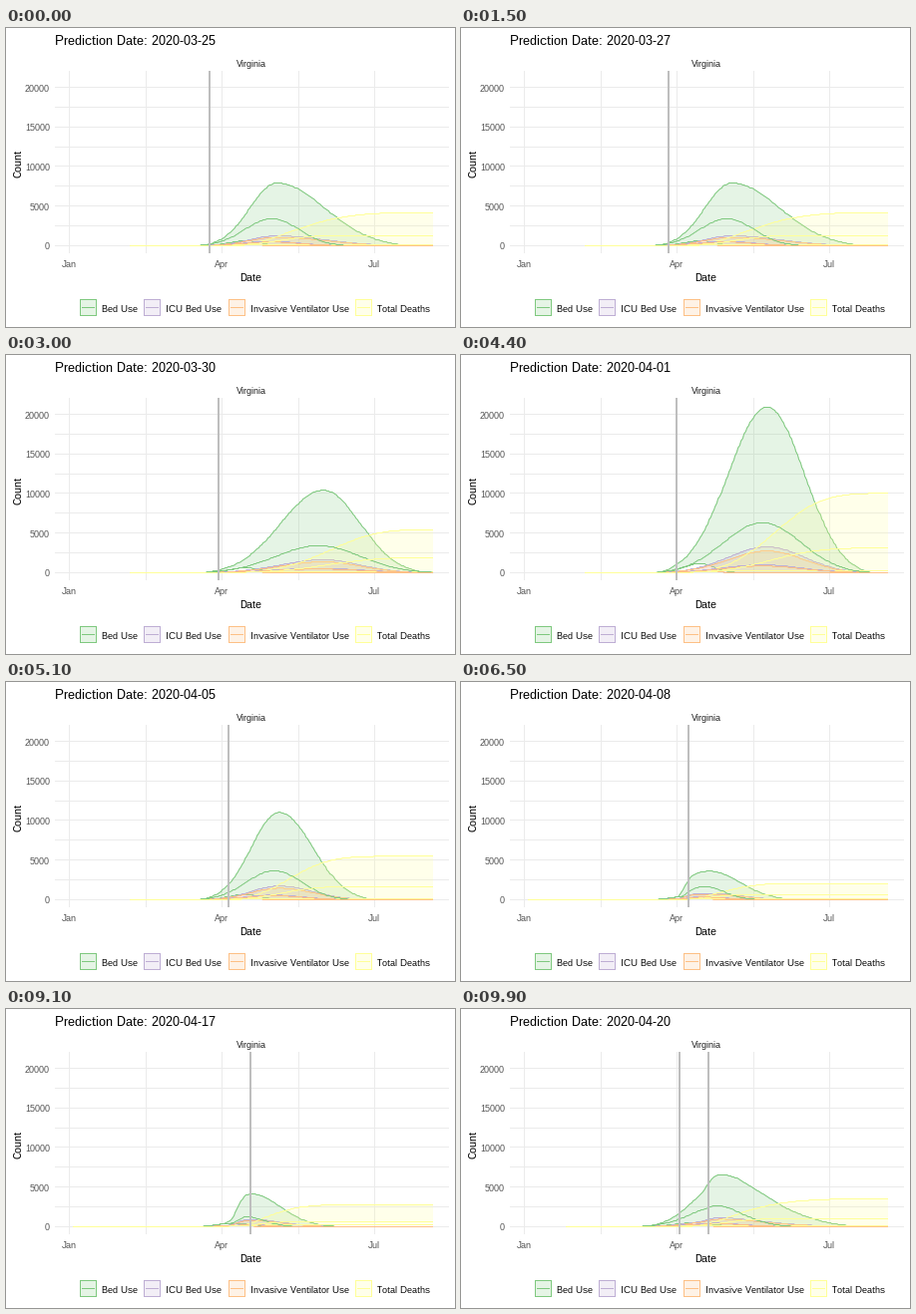
Write a matplotlib script that moves like this. It is 450x300 px and loops after 10 s.

```python
import math
import numpy as np
import matplotlib
import matplotlib.pyplot as plt
from matplotlib.animation import FuncAnimation
from matplotlib.colors import to_rgba
from matplotlib.patches import Rectangle

matplotlib.rcParams.update({
    "font.family": "Liberation Sans",
    "text.hinting": "native",
    "text.hinting_factor": 1,
})

W, H, DPI = 450, 300, 100
PX = 72 / DPI                       # one pixel in points
LEFT, RIGHT, TOP, BOTTOM = 49, 444, 43, 226
DAY = 153 / 91                      # pixels per day
END = 427
FRAMES, STEP = 100, 100
GRID, MARK = "#EBEBEB", "#BEBEBE"

GROUPS = [("Bed Use", "#7FC97F", 74), ("ICU Bed Use", "#BEAED4", 138),
          ("Invasive Ventilator Use", "#FDC086", 223), ("Total Deaths", "#FFFF99", 350)]

# prediction dates as days after 1 January, and the frames on which they settle
DAYS = [84, 85, 86, 88, 89, 90, 91, 95, 97, 98, 100, 103, 107, 110]
ARRIVALS = [0, 6, 15, *range(23, FRAMES + 1, 7)]
REUSED = {85: 84, 86: 84, 97: 95}   # dates that keep an earlier forecast
LATE = 98                           # from here on the forecast joins observed data

# day: highest bed use, mean bed use, peak position, fall width, total deaths
KEYS = {
    84: (7900, 3400, 271.5, 48, 4150),
    88: (14500, 3700, 300, 33, 7150),
    89: (10400, 3400, 318, 37, 5450),
    91: (20900, 6300, 307, 37, 10000),
    98: (3600, 1650, 249, 31, 2050),
    103: (4850, 1550, 257, 33, 4050),
    110: (3900, 1200, 240, 29, 2200),
}


def px_y(count):
    return 218.3 - count * 0.00794


def snap(v):
    return np.floor(v) + 0.5


def bump(x, peak, height, left, right):
    z = (x - peak) / np.where(x < peak, left, right)
    return height * np.clip(np.exp(-z * z / 2) - 0.02, 0, None) / 0.98


def rise(x, mid, width):
    return 1 / (1 + np.exp(-np.clip((x - mid) / width, -50, 50)))


def forecast(day):
    """x positions and the low, mean and high counts of the four groups."""
    day = REUSED.get(day, day)
    high, mean, peak, fall, deaths = (np.interp(day, list(KEYS), col) for col in zip(*KEYS.values()))
    late = day >= LATE
    spread = (peak - 190) / 3
    today = 63 + day * DAY
    joint = min(today - 5, peak - 15)

    def beds(x):
        curves = np.array([bump(x, 240, 0.18 * mean, 16, 14),
                           bump(x, peak - 5, mean, spread, spread),
                           bump(x, peak, high, 34 if late else spread, fall)])
        if late:
            past = 400 * rise(x, 209, 5) * (x < today)
            curves = np.maximum(curves * rise(x, joint, 3), past)
        return curves

    x = np.linspace(67 if late else 124, END, 200)
    bed = beds(x)
    icu = bed * (0.22 if late else 0.155)
    dead = np.cumsum(beds(x - 9), axis=1)   # deaths add up with a lag
    dead *= deaths / dead[2, -1]
    return x, np.array([bed, icu, icu * 0.84, dead])


def blend(a, b, t):
    return [p + (q - p) * t for p, q in zip(a, b)]


def date_text(day):
    month, d = divmod(day - 60, 31)
    return f"Prediction Date: 2020-{month + 3:02d}-{d + 1:02d}"


FORECASTS = [forecast(day) for day in DAYS]

fig = plt.figure(figsize=(W / DPI, H / DPI), dpi=DPI, facecolor="white")
ax = fig.add_axes([0, 0, 1, 1])
ax.set(xlim=(0, W), ylim=(H, 0))
ax.axis("off")


def box(x, y, w, h, color, z=1):
    return ax.add_patch(Rectangle((x, y), w, h, fc=color, lw=0, antialiased=False, zorder=z))


def label(x, y, s, size=9, color="black", **kw):
    return ax.text(x, y, s, fontsize=size * PX, color=color, va="baseline", zorder=9, **kw)


def curve(color, z):
    return ax.plot([], [], color=color, lw=PX, zorder=z, snap=False)[0]


# grid and axes
for count in range(0, 22500, 2500):
    box(LEFT, math.floor(px_y(count)), RIGHT - LEFT, 1, GRID)
    if count % 5000 == 0:
        label(44, round(px_y(count)) + 4, str(count), color="#4D4D4D", ha="right")
for i in range(5):
    box(round(63.4 + 76.5 * i), TOP, 1, BOTTOM - TOP, GRID)
for i, month in enumerate(("Jan", "Apr", "Jul")):
    label(63 + 153 * i, 240, month, color="#4D4D4D", ha="center")
label(245.5, 254, "Date", 11, ha="center")
ax.text(18, 136, "Count", fontsize=11 * PX, rotation=90, ha="right", va="center")
label(246, 39, "Virginia", color="#1A1A1A", ha="center")
title = label(49, 17, "", 13)

# legend
for name, color, x in GROUPS:
    box(x, 272, 17, 17, color)
    box(x + 1, 273, 15, 15, "white", 1.1)
    box(x + 1, 273, 15, 15, to_rgba(color, 0.2), 1.2)
    box(x + 2, 280, 13, 1, color, 1.3)
    label(x + 22, 285, name)

fills, curves = [], []
for i, (_, color, _) in enumerate(GROUPS):
    z = 3 + i / 10
    fills.append(ax.fill([0, 1], [0, 1], fc=to_rgba(color, 0.2), lw=0, antialiased=False, zorder=z)[0])
    curves.append([curve(color, z), curve(color, z + 1), curve(color, z)])
today = box(0, TOP, 2, BOTTOM - TOP, MARK, 5)
leftover = box(0, TOP, 2, BOTTOM - TOP, MARK, 5)


def line_x(day):
    return round(63 + day * DAY) - 1


def update(frame):
    k = max(i for i, a in enumerate(ARRIVALS) if a <= frame)
    nxt = (k + 1) % len(DAYS)
    arrive = ARRIVALS[k + 1]
    steps = 4 if k == 2 else 3
    t = max(0, 1 - (arrive - frame) / steps)

    title.set_text(date_text(DAYS[k]))
    today.set_x(line_x(DAYS[k] + (DAYS[nxt] - DAYS[k]) * t))
    leftover.set_x(line_x(DAYS[k]))
    leftover.set_visible(nxt == 0)

    x, bands = blend(FORECASTS[k], FORECASTS[nxt], t)
    x = snap(x)
    for fill, lines, ys in zip(fills, curves, snap(px_y(bands))):
        fill.set_xy(np.column_stack([np.r_[x, x[::-1]], np.r_[ys[2], ys[0][::-1]]]))
        for line, y in zip(lines, ys):
            line.set_data(x, y)
    return [title, today, leftover, *fills, *sum(curves, [])]


anim = FuncAnimation(fig, update, frames=FRAMES, interval=STEP, repeat=True,
                     repeat_delay=0, init_func=lambda: update(0), blit=False)
plt.show()
```
